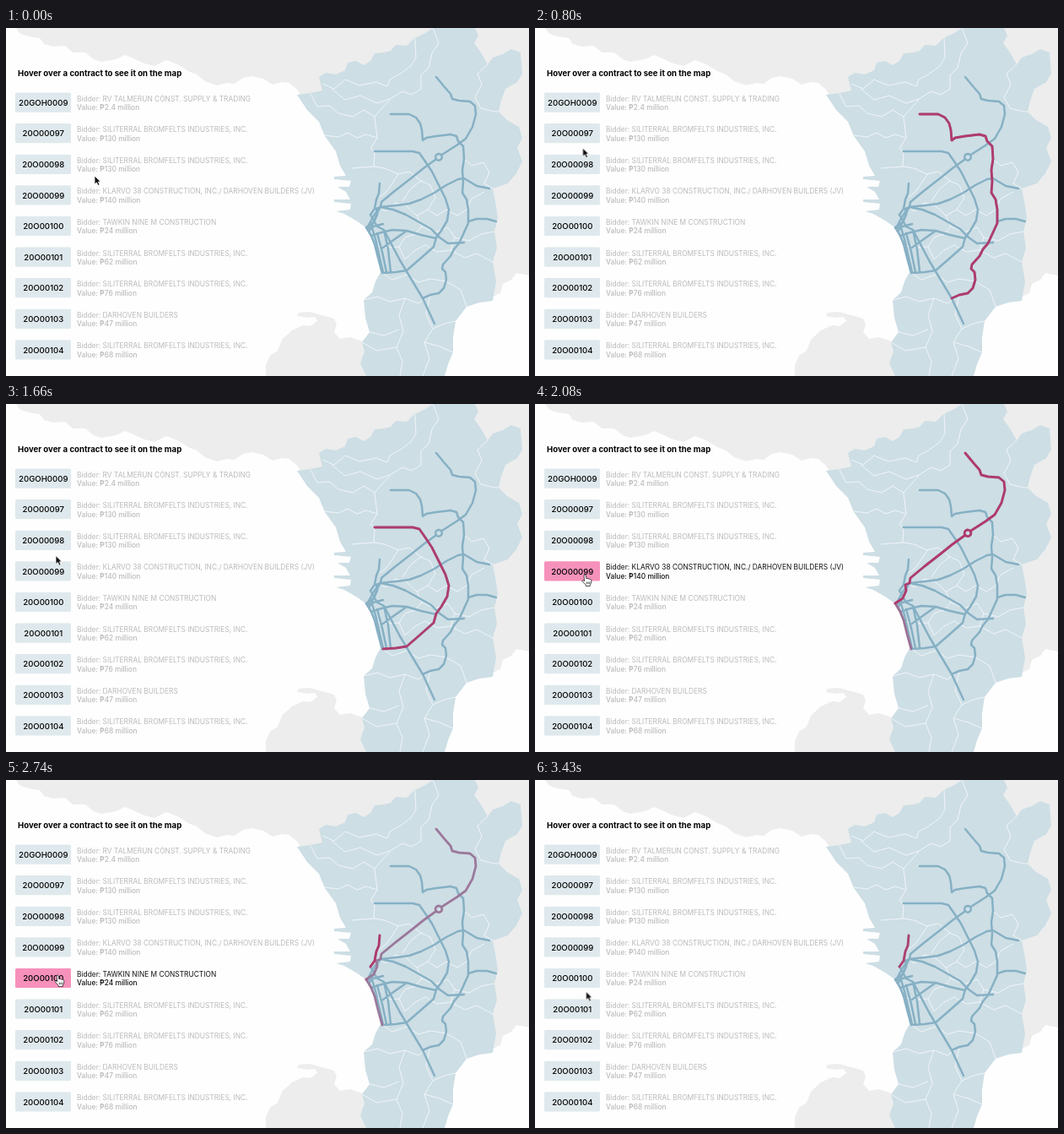
Write an HTML page that moves like this. It is 620 px wide and 412 px high and loops after 3490 ms.

```html
<!DOCTYPE html>
<html lang="en">
<head>
<meta charset="utf-8">
<title>Contracts on the map</title>
<style>
html, body { margin: 0; width: 100%; height: 100%; overflow: hidden; background: #fefefe; }
svg { display: block; width: 620px; height: 412px; font-family: Inter, Roboto, sans-serif; }
.land { fill: #ededed; }
.city { fill: #cddee5; }
.borders { fill: none; stroke: #f4f8fa; stroke-width: .9; stroke-linejoin: round; }
.roads, .hot { fill: none; stroke-width: 2.5; stroke-linejoin: round; stroke-linecap: round; }
.roads { stroke: #86b0c4; }
.hot { stroke: #b03a6c; stroke-width: 2.9; }
.title { font-size: 9.6px; font-weight: 700; }
.id { font-size: 9.6px; font-weight: 500; text-anchor: middle; }
.note { font-size: 8.4px; fill: var(--ink); }
.value { font-weight: 500; }
.row { --btn: #dfe9ed; --ink: #bababa; }
.row rect { fill: var(--btn); }
.hot path { opacity: 0; }

.row, .hot path, .cursor, .hands { animation: 3490ms linear infinite; }
.row, .hands { animation-timing-function: step-end; }
.row1 { animation-name: row1; }
.row2 { animation-name: row2; }
.row3 { animation-name: row3; }
.row4 { animation-name: row4; }
.hot .road1 { animation-name: road1; }
.hot .road2 { animation-name: road2; }
.hot .road3 { animation-name: road3; }
.hot .coast { animation-name: coast; }
.hot .road4 { animation-name: road4; }
.cursor { animation-name: move; }
.hands { --hand: 0; animation-name: hands; }
.hand { opacity: var(--hand); }
.arrow { opacity: calc(1 - var(--hand)); }

@keyframes row1 { 8.6% { --btn: #f691bb; --ink: #111; } 21.78% { --btn: #dfe9ed; --ink: #bababa; } }
@keyframes row2 { 26.36% { --btn: #f691bb; --ink: #111; } 45.85% { --btn: #dfe9ed; --ink: #bababa; } }
@keyframes row3 { 52.72% { --btn: #f691bb; --ink: #111; } 69.91% { --btn: #dfe9ed; --ink: #bababa; } }
@keyframes row4 { 73.35% { --btn: #f691bb; --ink: #111; } 97.13% { --btn: #dfe9ed; --ink: #bababa; } }

@keyframes road1 {
  0%, 8.6% { opacity: 0; } 14.3% { opacity: 1; }
  21.78% { opacity: 1; animation-timing-function: ease-in-out; } 35%, 100% { opacity: 0; }
}
@keyframes road2 {
  0%, 26.36% { opacity: 0; } 32% { opacity: 1; }
  45.85% { opacity: 1; animation-timing-function: ease-in-out; } 59%, 100% { opacity: 0; }
}
@keyframes road3 {
  0%, 52.72% { opacity: 0; } 58.5% { opacity: 1; }
  69.91% { opacity: 1; animation-timing-function: ease-in-out; } 86.5%, 100% { opacity: 0; }
}
@keyframes coast {
  0%, 56.5% { opacity: 0; } 62.5% { opacity: 1; }
  69.91% { opacity: 1; animation-timing-function: ease-in-out; } 86.5%, 100% { opacity: 0; }
}
@keyframes road4 {
  0%, 73.35% { opacity: 0; } 78%, 97.13% { opacity: 1; } 100% { opacity: .82; }
}
@keyframes hands {
  8.6%, 26.36%, 52.72%, 73.35% { --hand: 1; }
  21.78%, 45.85%, 69.91%, 97.13% { --hand: 0; }
}
@keyframes move {
  0%, 1.72% { transform: translate(105px, 175px); }
  8.6% { transform: translate(72px, 134px); }
  12.03%, 17.77% { transform: translate(60px, 128px); }
  22.92% { transform: translate(56.5px, 142px); }
  31.52%, 38.68% { transform: translate(59px, 167px); }
  45.85% { transform: translate(59px, 175px); }
  47.56% { transform: translate(59px, 179.5px); }
  52.72% { transform: translate(59px, 188px); }
  59.6%, 64.76% { transform: translate(59px, 202px); }
  69.91% { transform: translate(60px, 211px); }
  73.35% { transform: translate(60px, 223px); }
  78.51% { transform: translate(61px, 231px); }
  89.11%, 94.84% { transform: translate(60px, 236px); }
  97.13% { transform: translate(60px, 246px); }
  98.28%, 100% { transform: translate(60.5px, 250.5px); }
}
</style>
</head>
<body>
<svg viewBox="0 0 620 412">
  <path class="land" d="M12 0 17 7 27 10 40 12 45 19 56 22 70 21 79 29 94 29 104 37 113 40 130 37 141 32 151 36 164 42 176 45 190 38 203 43 216 51 226 55 236 63 250 68 262 65 271 66 281 59 291 57 305 60 316 67 327 64 336 65 345 73 352 84 400 120 560 250 578 318 586 314 589 303 599 298 605 290 620 293V0Z"/>
  <path class="land" d="M308 412 308 399 313 388 322 382 327 369 339 358 352 352 361 353 369 347 366 342 356 343 345 341 347 337 360 336 371 339 389 344 392 351 389 360 396 368 408 366 420 370 440 380V412Z"/>
  <path class="city" d="M371 58 379 53 391 55 402 50 405 41 415 39 424 44 432 39 437 30 448 29 456 27 462 20 475 21 484 12 497 6 506 0H556L560 9 555 18 563 29 571 43 577 35 589 31 599 25 610 29 612 54 606 64 592 72 587 86 584 99 594 109 608 117 612 130 606 142 612 158 605 172 595 184 577 190 580 205 583 225 579 241 582 260 577 277 581 300 577 323 561 325 546 330 533 347 530 366 530 384 524 398 520 412H427L420 397 425 383 422 372 431 360 426 343 424 322 434 313 438 300 444 289 438 260 428 237 415 228 401 220 391 217 408 215 409 208 389 206 389 203 408 203 403 194 393 188 407 188 409 181 389 179 389 176 403 175 396 163 391 146 378 128 371 111 357 97 345 79 361 77 375 74Z"/>
  <g class="borders">
    <path d="M361 78 369 93 384 92 394 101 411 105 424 97 437 105 440 130 432 143 437 146 436 164 410 166M375 66 389 72 402 61 419 68 439 64 452 69 455 61 466 55 480 45 486 35 485 12"/>
    <path d="M386 72 402 85 420 80 440 89 455 84 470 75 481 79 492 72 492 56 501 47 505 30 513 18 506 0M437 105 444 97 455 85M377 127 394 129 405 124 416 130 427 126 440 130"/>
    <path d="M436 164 449 166 465 173 478 170 492 181 503 186 509 201 500 215 487 222 474 210 462 207 449 217 442 211M465 173 458 184 451 194 443 200M492 181 480 190 470 205"/>
    <path d="M571 43 559 54 564 67 556 82 563 95 579 99 584 99M543 155 552 163 566 159 573 171 567 184 577 190M500 215 511 222 522 215 535 222 546 215 552 202 567 194"/>
    <path d="M487 222 493 235 485 244 473 248 466 259 451 260 439 258M493 235 509 242 524 236 532 248 527 263 511 265 497 257 485 263 473 274 466 259"/>
    <path d="M527 263 544 272 558 267 577 277M532 248 549 252 563 244 579 241M444 289 458 298 475 292 489 301 503 297 522 300 539 310 546 330M424 322 440 318 455 324 473 320 489 326 503 316"/>
    <path d="M473 320 466 340 471 359 463 378 470 395 467 412M503 316 498 339 506 356 496 372 502 391 494 412M431 360 448 364 466 357M506 356 520 350 533 347M422 372 439 382 463 378M496 372 514 377 530 384"/>
  </g>
  <g class="roads" id="roads">
    <path d="M428 237 436 222 444 212 463 210 478 208 492 203 508 195 522 186 536 179 543 178 558 187 573 190"/>
    <path d="M444 212 459 215 474 221 490 230 504 238 514 248 524 255 543 254M548 229 558 226 570 226 581 229"/>
    <path d="M432 221 440 235 448 239 467 275 494 320 508 350M428 237 447 232M433 246 445 242 458 239 475 240 492 245 510 249"/>
    <path d="M432 230 438 250 443 272 447 289M440 243 446 265 451 289M448 239 453 262 456 289M447 260 458 252 475 240M443 212 437 227 431 240"/>
  </g>
  <g class="hot" id="hot"></g>
  <text class="title" x="14" y="56.6">Hover over a contract to see it on the map</text>
  <g id="list"></g>
  <g class="cursor">
    <g class="hands">
      <path class="arrow" d="M0 0V10L2.4 7.9 4.1 11.5 6 10.6 4.4 7.1H7.3Z" fill="#111" stroke="#fff" stroke-width=".8"/>
      <g class="hand" stroke="#222" stroke-width=".8" stroke-linejoin="round" fill="none">
        <path fill="#fff" d="M-1 1C-1-.4 1-.4 1.2 1L2 5C2.4 4 4 4.2 4.1 5.3 4.7 4.4 6 4.8 6.1 5.8 7 5.2 8 5.8 7.9 7L7.4 10.2 6.3 12V13.5H1.2V12.2L-3 7.8C-3.2 6.4-1.6 6.2-.4 7.8Z"/>
        <path d="M2.2 8.6V11M4 8.6V11M5.7 8.6V11"/>
      </g>
    </g>
  </g>
</svg>
<script>
const roads = [
  ['road1', 'M456 102H478L486 106 491 113 493 121 494 133 498 130 510 128 527 126 534 128 536 134 542 140 543 155 541 168 542 182 541 195 546 203 548 215 548 231 543 242 537 255 531 262 527 270 518 280 517 285 521 289 522 298 519 308 513 314 503 316 494 320'],
  ['road2', 'M437 146H482L490 148 497 158 505 170 513 186 521 202 525 215 523 228 516 240 510 248 507 259 490 274 475 287 462 289 447 290'],
  ['road3', 'M510 58 520 70 527 78 529 84 537 86 550 87 556 92 557 102 553 117 545 131 534 139 516 150.5A3.6 3.6 0 1 0 510 155.2 3.6 3.6 0 0 0 516 150.5M510 155.2 495 166 480 178 462 192 445 206 444 212 439 214 440 221 436 230 427 236'],
  ['coast', 'M427 236 433 246 437 256 441 272 446 290'],
  ['road4', 'M443 184 442 196 439 203 437 214 432 221']
];
const draw = ([name, d]) => `<path class="${name}" d="${d}"/>`;
const roadMarkup = roads.map(draw).join('');
document.getElementById('roads').innerHTML += roadMarkup;
document.getElementById('hot').innerHTML = roadMarkup;

const main = 'SILITERRAL BROMFELTS INDUSTRIES, INC.';
const contracts = [
  ['20GOH0009', 'RV TALMERUN CONST. SUPPLY &amp; TRADING', '2.4'],
  ['20O00097', main, 130],
  ['20O00098', main, 130],
  ['20O00099', 'KLARVO 38 CONSTRUCTION, INC./ DARHOVEN BUILDERS (JV)', 140],
  ['20O00100', 'TAWKIN NINE M CONSTRUCTION', 24],
  ['20O00101', main, 62],
  ['20O00102', main, 76],
  ['20O00103', 'DARHOVEN BUILDERS', 47],
  ['20O00104', main, 68]
];
document.getElementById('list').innerHTML = contracts.map(([id, bidder, value], i) => `
  <g class="row row${i}" transform="translate(0 ${88.2 + i * 36.6})">
    <rect x="11" y="-11.7" width="66" height="23.2" rx="1.5"/>
    <text class="id" x="44.3" y="3.5">${id}</text>
    <text class="note" x="84" y="-1.6">Bidder: ${bidder}</text>
    <text class="note value" x="84" y="8.8">Value: ₱${value} million</text>
  </g>`).join('');
</script>
</body>
</html>
```
